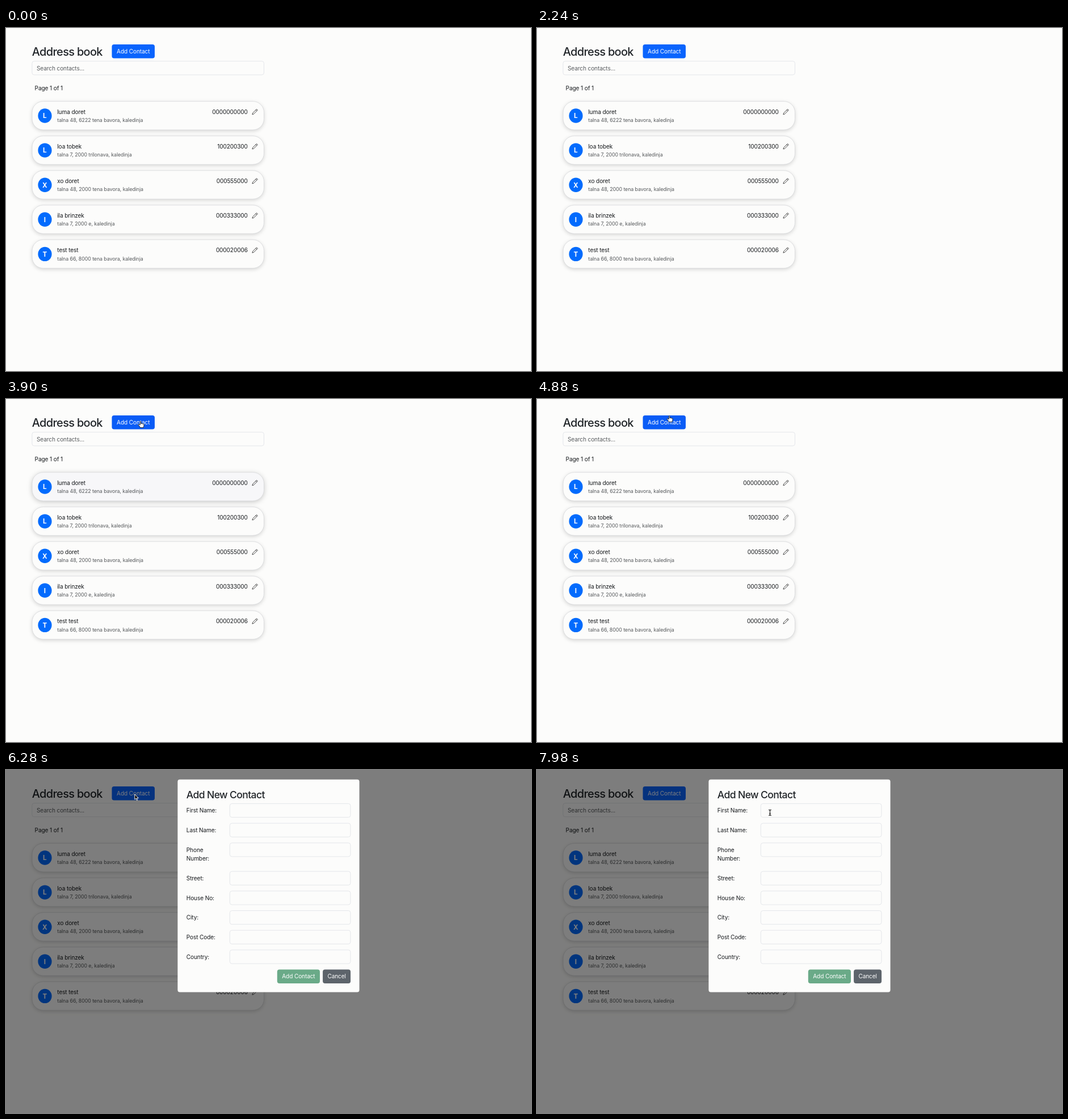
An HTML page for the animation above (8000 ms loop, 925 by 606 pixels).

```html
<!DOCTYPE html>
<html lang="en">
<head>
<meta charset="utf-8">
<title>Address book</title>
<style>
  html, body { margin: 0; width: 100%; height: 100%; overflow: hidden; background: #fcfcfb; }
  svg { display: block; }
  text {
    font: 400 10.1px Inter, "Open Sans", sans-serif;
    letter-spacing: -.12px; font-optical-sizing: none; fill: #16191c;
  }
  .title { font-size: 20px; font-weight: 500; letter-spacing: -.7px; fill: #212529; }
  .subtitle { font-size: 17.6px; font-weight: 500; letter-spacing: -.65px; fill: #212529; }
  .small { font-size: 8.9px; letter-spacing: -.1px; fill: #56595c; }
  .hint { fill: #595c5f; }
  .light { fill: #fff; text-anchor: middle; }
  .end { text-anchor: end; }
  .initial { font-size: 11.7px; font-weight: 700; letter-spacing: 0; fill: #fff; text-anchor: middle; }
  .field { fill: #fcfcfb; stroke: #dfe1e6; stroke-width: .8; }
  .card { fill: #fcfcfb; stroke: #d6d7da; stroke-width: .8; filter: drop-shadow(0 2.6px 3.4px rgba(0,0,0,.15)); }
  .card.hover { fill: #f7f7f9; filter: drop-shadow(0 2.6px 4px rgba(0,0,0,.2)); }
  .primary { fill: #0a64fd; }
  .primary.hover { fill: #0a5cf6; }
  .pencil { fill: none; stroke: #222; stroke-width: 1.25; }
  .hand { fill: #fff; stroke: #1c1c1c; stroke-width: .9; }
  .arrow { fill: #111; stroke: #fff; stroke-width: .9; }
  .beam { fill: none; stroke: #111; stroke-width: 1.1; }
  path { stroke-linejoin: round; }
</style>
</head>
<body>
<svg id="stage" width="925" height="606" viewBox="0 0 925 606"></svg>
<script>
const LOOP = 8000, ENTER_AT = 2350, HOVER_AT = 2500, HOVER_END = 4150, DIALOG_AT = 6060;
const stage = document.getElementById('stage');

function add(parent, tag, attrs = {}, content = '') {
  const el = document.createElementNS('http://www.w3.org/2000/svg', tag);
  for (const [name, value] of Object.entries(attrs)) el.setAttribute(name, value);
  el.textContent = content;
  parent.append(el);
  return el;
}
const label = (parent, x, y, content, cls = '') => add(parent, 'text', { x, y, class: cls }, content);
const box = (parent, x, y, width, height, rx, attrs) =>
  add(parent, 'rect', { x, y, width, height, rx, ...attrs });
const field = (parent, x, y, width) => box(parent, x, y, width, 24.2, 3.8, { class: 'field' });
function button(parent, x, y, width, content, attrs) {
  const rect = box(parent, x, y, width, 24.5, 4, attrs);
  label(parent, x + width / 2, y + 16, content, 'light');
  return rect;
}

// Address book page
label(stage, 45.8, 49, 'Address book', 'title');
const addButton = button(stage, 186.5, 29, 75.5, 'Add Contact', { class: 'primary' });
const search = field(stage, 45.9, 58.6, 408.6);
label(stage, 54, 74.7, 'Search contacts...', 'hint');
label(stage, 50.6, 109.8, 'Page 1 of 1');

const contacts = [
  ['luma doret', 'talna 48, 6222 tena bavora, kaledinja', '0000000000'],
  ['loa tobek', 'talna 7, 2000 trilonava, kaledinja', '100200300'],
  ['xo doret', 'talna 48, 2000 tena bavora, kaledinja', '000555000'],
  ['ila brinzek', 'talna 7, 2000 e, kaledinja', '000333000'],
  ['test test', 'talna 66, 8000 tena bavora, kaledinja', '000020006'],
];
const cards = contacts.map(([name, address, phone], i) => {
  const y = 129.6 + i * 61.1;
  const card = box(stage, 46, y, 408.5, 50.4, 19.5, { class: 'card' });
  add(stage, 'ellipse', { cx: 68.5, cy: y + 25.4, rx: 12.1, ry: 12.7, fill: '#026bfd' });
  label(stage, 68.4, y + 29.7, name[0].toUpperCase(), 'initial');
  label(stage, 90.3, y + 22.1, name);
  label(stage, 90.3, y + 36.5, address, 'small');
  label(stage, 425.8, y + 22.1, phone, 'end');
  add(stage, 'path', {
    class: 'pencil', transform: `translate(433.3 ${y + 13.2}) scale(.66)`,
    d: 'M12.5.8 15.2 3.5 4.8 13.9.9 15.1 2.1 11.2ZM10.3 3 13 5.7',
  });
  return card;
});

// Dialog
const dialog = add(stage, 'g');
box(dialog, 0, 0, 925, 606, 0, { opacity: .5 });
box(dialog, 302.4, 16.8, 320.2, 375.6, 4, { fill: '#fcfcfb' });
label(dialog, 317.8, 49.6, 'Add New Contact', 'subtitle');
const captions = ['First Name:', 'Last Name:', 'Phone|Number:', 'Street:',
  'House No:', 'City:', 'Post Code:', 'Country:'];
let rowY = 59.4;
const inputs = captions.map(caption => {
  const input = field(dialog, 394.3, rowY, 212.7);
  const lines = caption.split('|');
  lines.forEach((line, i) => label(dialog, 317.8, rowY + 15.9 + i * 15.6, line));
  rowY += 34.7 + (lines.length - 1) * 15.6;
  return input;
});
button(dialog, 477.8, 352.4, 75.2, 'Add Contact', { fill: '#6aaa88' });
button(dialog, 558.1, 352.4, 49, 'Cancel', { fill: '#5d646b' });

// Pointer shapes, each drawn around its centre
const pointer = add(stage, 'g');
const shapes = {
  hand: 'M-1.8 1V-4.4q0-1 .9-1t.9 1V-1q.1-.8.9-.8t.9.9q.2-.6.9-.6t.8.9q.2-.5.8-.4.7.1.7.9V2q0 1.4-.8 2.3V5.5H-1.8V4.6L-4.6.9q-.5-1 .2-1.3t1.4.5z',
  arrow: 'M-3.2-5.2V4L-1.1 2.1.4 5.6 1.8 5 .4 1.6H3.4Z',
  beam: 'M-2.4-5Q0-5 0-3.6Q0-5 2.4-5M0-3.6V3.6M-2.4 5Q0 5 0 3.6Q0 5 2.4 5M-1.2 1.8H1.2',
};
const pointerShape = add(pointer, 'path');

// Key points of the pointer: time, x, y
const stops = [
  [ENTER_AT, 520, 169], [2940, 281, 135], [3230, 240, 40], [3900, 238, 45],
  [4880, 234, 35], [6000, 230, 48], [6650, 230, 48], [7550, 410.5, 75.3],
];
const clamp = v => Math.min(1, Math.max(0, v));
const smooth = v => v * v * (3 - 2 * v);

function pointerAt(time) {
  const next = stops.findIndex(stop => stop[0] > time);
  if (next < 1) return stops.at(next).slice(1);
  const [t0, x0, y0] = stops[next - 1], [t1, x1, y1] = stops[next];
  const k = smooth(clamp((time - t0) / (t1 - t0)));
  return [x0 + (x1 - x0) * k, y0 + (y1 - y0) * k];
}

function hits(rect, x, y) {
  const { x: left, y: top, width, height } = rect.getBBox();
  return x >= left && x <= left + width && y >= top && y <= top + height;
}

function draw(now) {
  const time = now % LOOP;
  const open = time >= DIALOG_AT;
  const [x, y] = pointerAt(time);
  const under = rect => hits(rect, x, y);
  const clickable = open ? [] : [addButton, ...cards];
  const editable = open ? inputs : [search];
  const shape = clickable.some(under) ? 'hand' : editable.some(under) ? 'beam' : 'arrow';

  pointer.setAttribute('transform', `translate(${x} ${y})`);
  pointer.setAttribute('visibility', time < ENTER_AT ? 'hidden' : 'visible');
  pointerShape.setAttribute('d', shapes[shape]);
  pointerShape.setAttribute('class', shape);
  dialog.setAttribute('visibility', open ? 'visible' : 'hidden');
  addButton.classList.toggle('hover', !open && under(addButton));
  cards[0].classList.toggle('hover', time >= HOVER_AT && time < HOVER_END);
  requestAnimationFrame(draw);
}
draw(performance.now());
</script>
</body>
</html>
```
